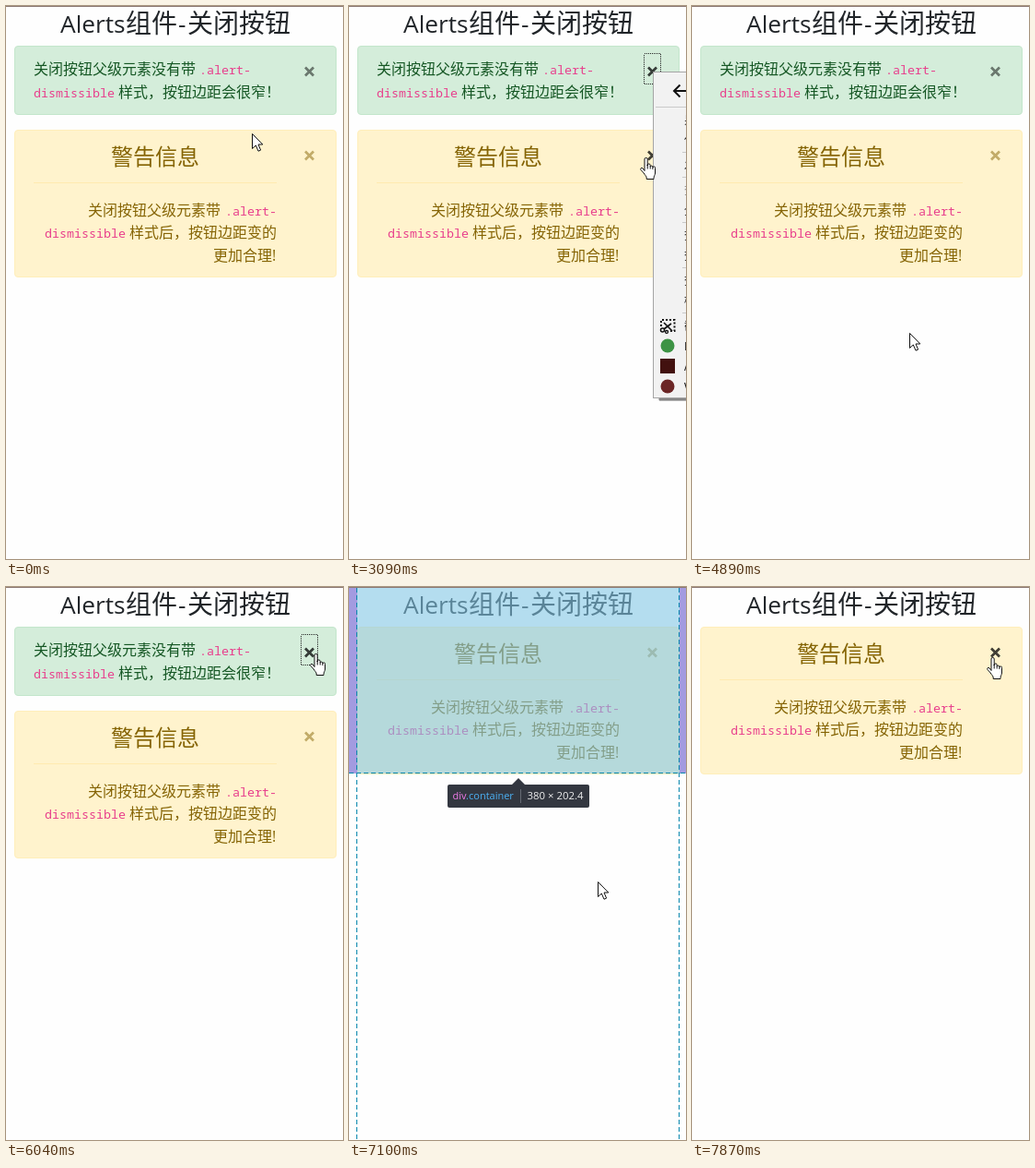
An HTML page that plays this animation: 366 px wide and 599 px high, repeating every 8 s.

```html
<!DOCTYPE html>
<html lang="zh-CN">
<head>
<meta charset="utf-8">
<title>Alerts</title>
<style>
html, body { margin: 0; width: 100%; height: 100%; overflow: hidden; background: #fefefe; }
svg { display: block; width: 366px; height: 599px; }
text { font: 16px 'Noto Sans CJK SC', 'Noto Sans CJK', sans-serif; white-space: pre; }
.latin { font-family: 'Open Sans', 'Noto Sans', sans-serif; }
.code { font: 13.33px 'Noto Sans Mono', 'DejaVu Sans Mono', monospace; fill: #e83e8c; }
.title { fill: #212529; }
.title text { font-size: 28px; }
.title .latin { font-size: 26.3px; }
.heading { font-size: 24px; }
.warn { fill: #856404; }
.ok { fill: #155724; }
.crisp, .ring { shape-rendering: crispEdges; }
.ring { fill: none; stroke: #222; stroke-dasharray: 1 1; }
.cross { fill: none; stroke-width: 2.7; }
.tip text { font: 11px 'Open Sans', 'Noto Sans', sans-serif; }
.tip .size { font-size: 11.4px; }
.menu text { font-size: 12px; fill: #111; }
.pointer { fill: #fff; stroke: #111; stroke-linejoin: round; }
</style>
</head>
<body>
<svg viewBox="0 0 366 599">
  <rect width="366" height="599" fill="#fefefe"/>
  <rect class="crisp" width="366" height="1" fill="#8d7a74"/>

  <g class="title">
    <text class="latin" x="59" y="29">Alerts</text>
    <text x="130" y="29">组件</text>
    <text class="latin" x="187" y="29">-</text>
    <text x="197" y="29">关闭按钮</text>
  </g>

  <g id="success" class="ok">
    <rect x="9.5" y="43.5" width="349" height="74" rx="3.5" fill="#d4edda" stroke="#c3e6cb"/>
    <text x="30" y="74">关闭按钮父级元素没有带</text>
    <text class="code" x="210" y="74">.alert-</text>
    <text class="code" x="30" y="99">dismissible</text>
    <text x="122" y="99">样式，按钮边距会很窄！</text>
    <path id="successCross" class="cross" d="M325 66.5l9 9m0-9l-9 9"/>
    <rect id="successRing" class="ring" x="320.5" y="51.5" width="18" height="33"/>
  </g>

  <g id="warning" class="warn">
    <rect x="9.5" y="134.5" width="349" height="159" rx="3.5" fill="#fff3cd" stroke="#ffeeba"/>
    <text class="heading" x="114" y="172">警告信息</text>
    <rect class="crisp" x="30" y="191" width="264" height="1" fill="#ffeab0"/>
    <text x="89" y="227">关闭按钮父级元素带</text>
    <text class="code" x="238" y="227">.alert-</text>
    <text class="code" x="42" y="251">dismissible</text>
    <text x="134" y="251">样式后，按钮边距变的</text>
    <text x="225" y="276">更加合理</text>
    <text class="latin" x="289" y="276">!</text>
    <path id="warningCross" class="cross" d="M325 157.5l9 9m0-9l-9 9"/>
    <rect id="warningRing" class="ring" x="300.5" y="134.5" width="58" height="49"/>
  </g>

  <g id="overlay">
    <path class="crisp" d="M0 1H9V202H0zM359 1H366V202H359z" fill="#a39be0"/>
    <rect class="crisp" x="9" y="1" width="350" height="201" fill="#81c8e6" fill-opacity=".59"/>
    <path class="crisp" d="M8.5 1V598M358.5 1V598M0 201.5H366" fill="none" stroke="#0787ad" stroke-dasharray="5 3"/>
    <g class="tip">
      <rect x="107" y="214" width="154" height="25" rx="2" fill="#333740"/>
      <path d="M177 214L184 207L191 214z" fill="#333740"/>
      <text x="112.5" y="230" fill="#4cb2f5"><tspan fill="#f07be8">div</tspan>.container</text>
      <rect class="crisp" x="186" y="219" width="1" height="15" fill="#666b74"/>
      <text class="size" x="193.5" y="230" fill="#eee">380 × 202.4</text>
    </g>
  </g>

  <rect id="band" class="crisp" x="314" y="294" width="52" height="230" fill="#f1f1f1"/>
  <g id="menu" class="menu">
    <rect x="7" y="7" width="200" height="350" fill="#000" fill-opacity=".3"/>
    <rect x="6" y="6" width="200" height="350" fill="#000" fill-opacity=".25"/>
    <rect x=".5" y=".5" width="200" height="353" fill="#f2f2f2" stroke="#a5a5a5"/>
    <path d="M38 21H23M29.5 14.5L23 21L29.5 27.5" fill="none" stroke="#111" stroke-width="2"/>
    <g id="items"></g>
    <g fill="none" stroke="#111">
      <path d="M9 276V269H23.5V281H19" stroke-width="2" stroke-dasharray="2 2"/>
      <path d="M12 272L21 281M20 273L12 279" stroke-width="1.7"/>
      <circle cx="10.5" cy="280" r="2" stroke-width="1.5"/>
      <circle cx="15" cy="282" r="1.5" stroke-width="1.3"/>
    </g>
    <circle cx="16" cy="297" r="7.5" fill="#3d9344"/>
    <rect x="8" y="311" width="16" height="16" fill="#42110f"/>
    <circle cx="16" cy="341" r="7.5" fill="#6b2626"/>
  </g>

  <path id="arrow" class="pointer" d="M.5.5V16.5L4.3 13L7 19.2L9.6 18.1L7 12H11.8z"/>
  <g id="hand" class="pointer">
    <path d="M-1 14.5V2a1.6 1.6 0 0 1 3.2 0V9V8.3a1.5 1.5 0 0 1 3 .3V10a1.4 1.4 0 0 1 2.7 .3V11a1.3 1.3 0 0 1 2.6 .5V17c0 2-1.5 3-1.5 5.5V23.5H1.2V22c0-1.5-2-3-3-5L-5 13.5c-1-1.7.8-2.8 2-1.7z"/>
    <path d="M2.2 8V12.5M5.2 9.5V12.5M7.9 10.5V13" fill="none"/>
  </g>
</svg>
<script>
const LOOP = 8000;
const $ = id => document.getElementById(id);

const groups = ['另存 保存', '发送', '查看 全选', '查找 查看', '查看 检查', '截图 ID A V'];

function menuItems() {
  const rule = (x, y) => `<rect class="crisp" x="${x}" y="${y}" width="${200 - x}" height="1" fill="#c9c9c9"/>`;
  let y = 52, out = rule(3, 38);
  groups.forEach((group, g) => {
    if (g) {
      out += rule(32, y - 9);
      y += 5;
    }
    group.split(' ').forEach((label, i) => {
      const dimmed = g === 2 && i === 0;
      out += `<text x="34" y="${y + 4.5}"${dimmed ? ' opacity=".5"' : ''}>${label}</text>`;
      y += 22;
    });
  });
  return out;
}
$('items').innerHTML = menuItems();

// Each leg bends from the last point towards "via" and is shown in a few hard steps
const home = [267, 138];
const legs = [
  { from: 280, until: 1250, steps: 7, via: [372, 130], to: [329, 69] },
  { from: 2300, until: 3090, steps: 7, via: [255, 115], to: [322, 164] },
  { from: 3240, until: 3240, steps: 1, via: [323, 159], to: [323, 159] },
  { from: 4200, until: 4500, steps: 3, via: [270, 300], to: [203, 427] },
  { from: 4770, until: 5740, steps: 8, via: [300, 220], to: [336, 72] },
  { from: 6290, until: 6440, steps: 2, via: [352, 150], to: [366, 520] },
  { from: 6710, until: 7870, steps: 10, via: [196, 372], to: [326, 76] }
];
const easeOut = p => 1 - (1 - p) ** 1.5;

function pointer(t) {
  let point = home;
  for (const { from, until, steps, via, to } of legs) {
    if (t < from) break;
    const gap = (until - from) / (steps - 1);
    const step = t >= until ? steps : 1 + Math.floor((t - from) / gap);
    const u = easeOut(step / steps);
    point = point.map((a, i) => (1 - u) ** 2 * a + 2 * u * (1 - u) * via[i] + u * u * to[i]);
  }
  return point.map(Math.round);
}

const show = (id, on) => $(id).style.display = on ? '' : 'none';
const place = (id, x, y) => $(id).setAttribute('transform', `translate(${x} ${y})`);
const during = (t, from, to) => t >= from && t < to;

function draw(t) {
  const [x, y] = pointer(t);
  const closed = t >= 6160;
  const lift = closed ? 91 : 0;
  const successFocus = during(t, 1250, 3240) || during(t, 6040, 6160);
  const warningFocus = during(t, 3240, 4500);
  const overSuccess = !closed && during(x, 320, 339) && during(y, 51, 85);
  const overWarning = during(x, 300, 359) && during(y + lift, 134, 183);
  const firstMenu = during(t, 1400, 3240);
  const secondMenu = during(t, 3360, 4770);

  show('success', !closed);
  show('successRing', successFocus);
  show('warningRing', warningFocus);
  place('warning', 0, -lift);
  $('successCross').setAttribute('stroke', overSuccess || successFocus ? '#353b37' : '#6a776d');
  $('warningCross').setAttribute('stroke', overWarning || warningFocus ? '#403d33' : '#c2ab68');

  show('overlay', during(t, 6440, 7230));
  show('menu', firstMenu || secondMenu);
  show('band', secondMenu);
  place('menu', firstMenu ? 330 : 323, firstMenu ? 71 : 165);

  const hand = overSuccess || overWarning;
  show('hand', hand);
  show('arrow', !hand);
  place(hand ? 'hand' : 'arrow', x, y);
}

const start = performance.now();
function tick() {
  draw((performance.now() - start) % LOOP);
  requestAnimationFrame(tick);
}
tick();
</script>
</body>
</html>
```
